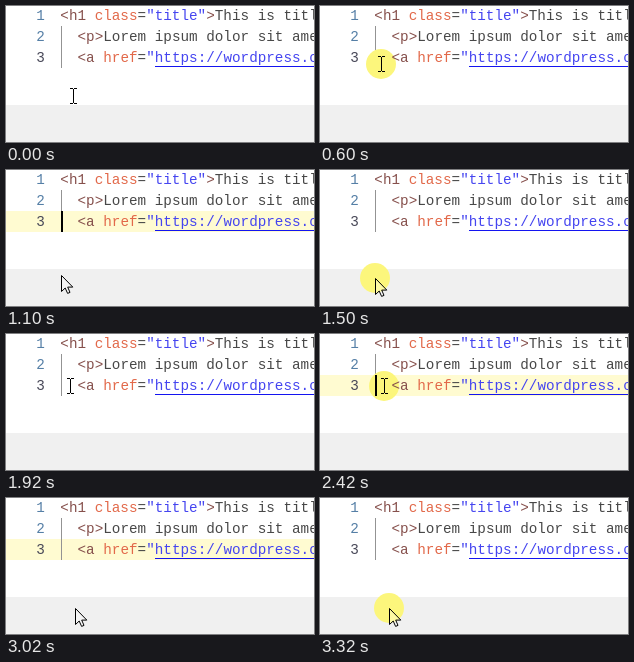
An HTML page that plays this animation: 308 by 136 pixels, repeating every 3.42 s.

```html
<!DOCTYPE html>
<html lang="en">
<head>
<meta charset="utf-8">
<style>
  html, body { margin: 0; width: 100%; height: 100%; overflow: hidden; background: #fff; }
  svg { display: block; }
  text { font: 14.3px "Liberation Mono", monospace; white-space: pre; fill: #484848; }
  .number { fill: #557fa6; }
  .active { fill: #484858; }
  .tag { fill: #86504c; }
  .attr { fill: #e2694a; }
  .string { fill: #4545f0; }
  #halo { fill: #fcf67c; }
</style>
</head>
<body>
<svg width="308" height="136" viewBox="0 0 308 136">
  <rect width="308" height="136" fill="#fff"/>
  <rect y="99" width="308" height="37" fill="#f0f0f0"/>
  <rect id="highlight" y="41" width="308" height="21" fill="#fffbd1"/>
  <rect x="55" y="20" width="1" height="42" fill="#939393"/>
  <circle id="halo" r="15"/>

  <text x="30.3" y="14" class="number">1</text>
  <text x="30.3" y="35" class="number">2</text>
  <text x="30.3" y="56" class="active">3</text>
  <text x="54.3" y="14"><tspan class="tag">&lt;h1 </tspan><tspan class="attr">class</tspan>=<tspan class="string">"title"</tspan><tspan class="tag">&gt;</tspan>This is title</text>
  <text x="71.5" y="35"><tspan class="tag">&lt;p&gt;</tspan>Lorem ipsum dolor sit amet</text>
  <text x="71.5" y="56"><tspan class="tag">&lt;a </tspan><tspan class="attr">href</tspan>=<tspan class="string">"https://wordpress.com</tspan></text>
  <rect x="149" y="60" width="159" height="1" fill="#1414f0"/>

  <rect id="caret" x="55" y="41" width="2" height="21" fill="#000"/>
  <path id="beam" d="M-3 -7.5H0M1 -7.5H4M.5 -7V7M-3 7.5H0M1 7.5H4" fill="none" stroke="#000"/>
  <path id="arrow" d="M.5 .5V16.5L4.2 13L6.6 18.4L9 17.4L6.7 12.1H11.8Z" fill="#fff" fill-opacity=".3" stroke="#000"/>
</svg>
<script>
  const LOOP = 3420, STEP = 100, HOLD = 200, BLINK = 500, PANEL_TOP = 99;

  // The pointer travels between stops and clicks at each; the editor reacts at "react".
  const stops = [
    { x: 61, y: 58, arrive: 400, press: 600, react: 700 },
    { x: 55, y: 108, arrive: 1200, press: 1400, react: 1400 },
    { x: 64, y: 52, arrive: 1920, press: 2420, react: 2420 },
    { x: 69, y: 110, arrive: 3020, press: 3320, react: 3320 }
  ];
  const origin = { x: 67, y: 90, press: -HOLD };

  const part = id => document.getElementById(id);
  const show = (id, on) => part(id).setAttribute("visibility", on ? "visible" : "hidden");
  const place = (id, x, y) => part(id).setAttribute("transform", `translate(${x} ${y})`);
  const easeOut = p => 1 - (1 - p) ** 2;

  function pointerAt(t) {
    const index = stops.findIndex(stop => t < stop.press + HOLD);
    const to = stops[index], from = stops[index - 1] ?? origin;
    const remaining = Math.max(0, Math.ceil((to.arrive - t) / STEP) * STEP);
    const progress = Math.max(0, 1 - remaining / (to.arrive - from.press - HOLD));
    const mix = axis => Math.round(from[axis] + (to[axis] - from[axis]) * easeOut(progress));
    return { x: mix("x"), y: mix("y"), pressed: t >= to.press };
  }

  function draw(t) {
    const { x, y, pressed } = pointerAt(t);
    const overPanel = y >= PANEL_TOP;
    for (const id of ["halo", "beam", "arrow"]) place(id, x, y);
    show("beam", !overPanel);
    show("arrow", overPanel);
    show("halo", pressed);

    const lastClick = stops.findLast(stop => stop.react <= t);
    const focused = lastClick?.y < PANEL_TOP;
    show("highlight", focused);
    show("caret", focused && t - lastClick.react < BLINK);
  }

  const start = performance.now();
  function tick() {
    draw((performance.now() - start) % LOOP);
    requestAnimationFrame(tick);
  }
  tick();
</script>
</body>
</html>
```
